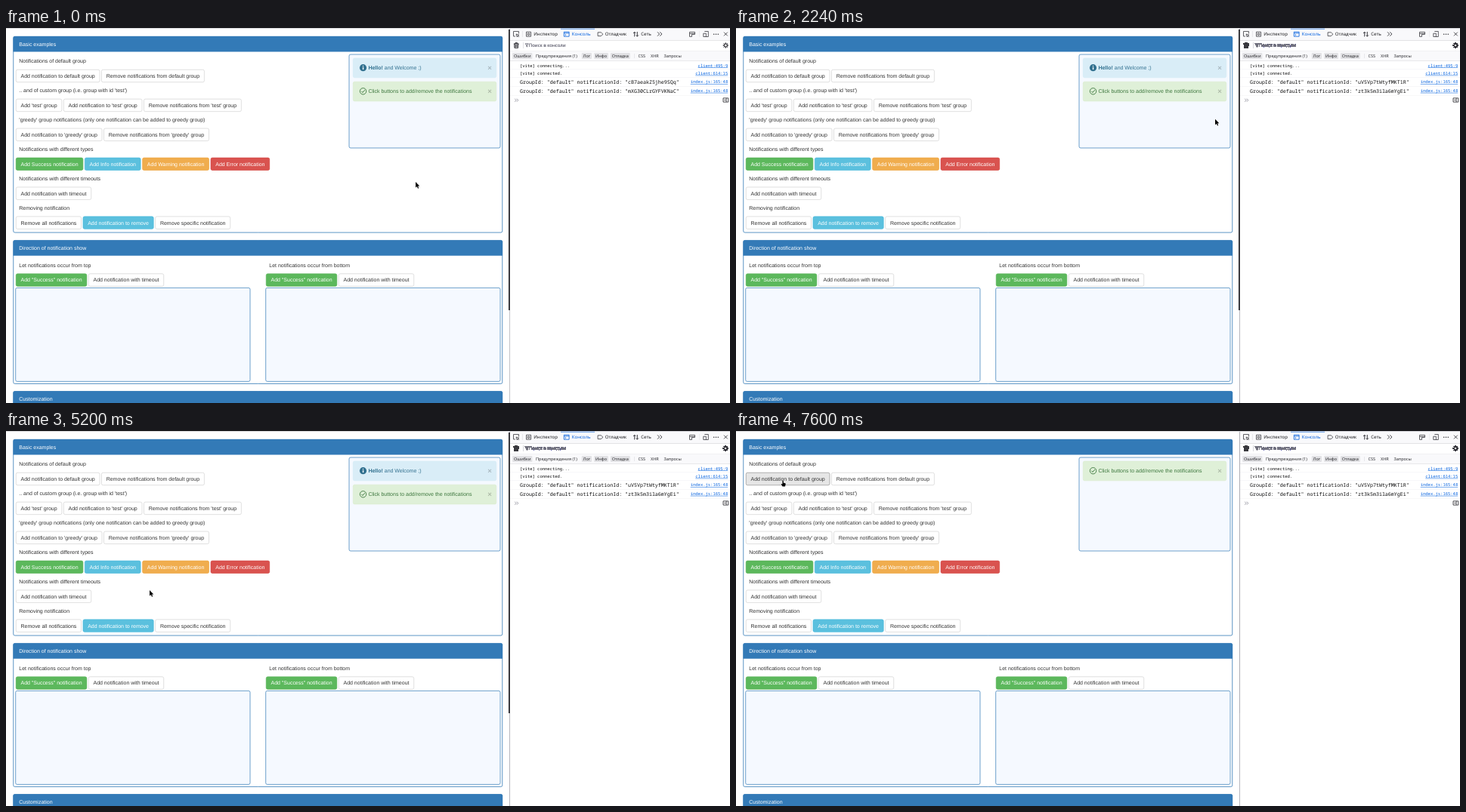
Animation of 958x497 px, one loop 8 s. Source, as an HTML page with a canvas:

```html
<!DOCTYPE html>
<html lang="en">
<head>
<meta charset="utf-8">
<title>Notification demo</title>
<style>
html, body { margin: 0; width: 100%; height: 100%; overflow: hidden; background: #fff; }
canvas { display: block; width: 958px; height: 497px; }
</style>
</head>
<body>
<canvas id="stage"></canvas>
<script>
const W = 958, H = 497, LOOP = 8000, STEP = 40;
const canvas = document.getElementById('stage');
const ctx = canvas.getContext('2d');
const dpr = window.devicePixelRatio || 1;
canvas.width = W * dpr;
canvas.height = H * dpr;

const SANS = '6.99px "Liberation Sans", Arial, sans-serif';
const UI = '"Noto Sans", sans-serif';
const MONO = '"Noto Sans Mono", monospace';
const BLUE = '#337ab7', INK = '#333', ICON = '#3a3a40', LINK = '#0060df';
const ROW = 38.92;

// [fill, border, text, hover fill, hover border]
const STYLES = {
  plain: ['#fff', '#ccc', INK, '#e6e6e6', '#a0a0a0'],
  success: ['#5cb85c', '#4cae4c', '#fff', '#449d44', '#398439'],
  info: ['#5bc0de', '#46b8da', '#fff', '#31b0d5', '#269abc'],
  warning: ['#f0ad4e', '#eea236', '#fff', '#ec971f', '#d58512'],
  danger: ['#d9534f', '#d43f3a', '#fff', '#c9302c', '#ac2925']
};

// time, x, y of the pointer tip
const PATH = [
  [0, 542, 204], [80, 541.7, 204], [160, 542, 204], [720, 542, 204], [800, 549, 208],
  [1000, 586, 218], [1200, 586, 218], [1240, 640, 218], [1360, 660, 218], [1440, 660, 217],
  [1840, 656.6, 218], [2040, 656.6, 218], [2200, 645, 150], [2400, 590, 4], [2600, 480, 110],
  [2800, 412, 179], [2880, 412, 179], [2960, 365, 171.5], [3040, 331.6, 170], [3280, 331.6, 170],
  [3320, 332, 169.3], [3440, 400, 173], [3560, 479, 155], [3800, 479, 155], [4000, 570, 95],
  [4160, 632, 62], [4320, 615, 50], [4440, 575.6, 50], [4640, 484, 94], [4840, 400, 140],
  [5040, 280, 195], [5200, 190, 211], [5480, 80, 194], [5600, 76, 186], [5720, 68, 152],
  [5760, 65, 130], [5880, 62, 102], [6080, 62, 90], [6320, 62, 65.5], [8000, 62, 65.5]
];

const clamp = v => Math.max(0, Math.min(1, v));
const ramp = (t, a, b) => clamp((t - a) / (b - a));
const ease = u => u * u * (3 - 2 * u);

function pointerAt(t) {
  const i = Math.max(1, PATH.findIndex(k => k[0] >= t));
  const [t0, x0, y0] = PATH[i - 1], [t1, x1, y1] = PATH[i];
  const u = ramp(t, t0, t1);
  return { x: x0 + (x1 - x0) * u, y: y0 + (y1 - y0) * u };
}

function rect(x, y, w, h, fill) {
  ctx.fillStyle = fill;
  ctx.fillRect(x, y, w, h);
}

function box(x, y, w, h, r, fill, border, line = 0.5) {
  ctx.beginPath();
  ctx.roundRect(x, y, w, h, r);
  if (fill) { ctx.fillStyle = fill; ctx.fill(); }
  if (border) { ctx.strokeStyle = border; ctx.lineWidth = line; ctx.stroke(); }
}

// y is the middle of the line
function text(s, x, y, color = INK, font = SANS, align = 'left') {
  ctx.font = font;
  ctx.textAlign = align;
  ctx.fillStyle = color;
  ctx.fillText(s, x, y + 2.4);
  return ctx.measureText(s).width;
}

function icon(d, x, y, color = ICON, line = 0.8, fill) {
  ctx.save();
  ctx.translate(x, y);
  const p = new Path2D(d);
  ctx.strokeStyle = ctx.fillStyle = color;
  ctx.lineWidth = line;
  if (fill) ctx.fill(p); else ctx.stroke(p);
  ctx.restore();
}

function dot(x, y, r, color) {
  ctx.beginPath();
  ctx.arc(x, y, r, 0, 7);
  ctx.fillStyle = color;
  ctx.fill();
}

function ring(x, y, r, color, line = 0.8) {
  ctx.beginPath();
  ctx.arc(x, y, r, 0, 7);
  ctx.strokeStyle = color;
  ctx.lineWidth = line;
  ctx.stroke();
}

// Row of buttons laid out by text width; returns whether one is hovered
function buttons(x, cy, items, mouse) {
  let hit = false;
  for (const [label, kind = 'plain'] of items) {
    ctx.font = SANS;
    const w = ctx.measureText(label).width + 13, y = cy - 8.5;
    const hot = mouse && mouse.x >= x && mouse.x <= x + w && mouse.y >= y && mouse.y <= y + 17;
    const c = STYLES[kind];
    box(x + 0.25, y + 0.25, w - 0.5, 16.5, 2, c[hot ? 3 : 0], c[hot ? 4 : 1], hot ? 0.8 : 0.6);
    text(label, x + 6.5, cy, c[2]);
    hit = hit || hot;
    x += w + 1.95;
  }
  return hit;
}

function panel(y, h, title) {
  box(9.75, y + 0.25, 647, h, 2, '#fff', BLUE, 0.8);
  box(9.5, y, 647.5, 20.5, [2, 2, 0, 0], BLUE);
  text(title, 17.3, y + 10.2, '#fff');
}

function page(mouse) {
  rect(0, 0, 666, H, '#fff');
  panel(11, 259.8, 'Basic examples');
  ['Notifications of default group', ".. and of custom group (i.e. group with id 'test')",
    "'greedy' group notifications (only one notification can be added to greedy group)",
    'Notifications with different types', 'Notifications with different timeouts', 'Removing notification'
  ].forEach((s, i) => text(s, 17.3, 44 + ROW * i));
  const rows = [
    [['Add notification to default group'], ['Remove notifications from default group']],
    [["Add 'test' group"], ["Add notification to 'test' group"], ["Remove notifications from 'test' group"]],
    [["Add notification to 'greedy' group"], ["Remove notifications from 'greedy' group"]],
    [['Add Success notification', 'success'], ['Add Info notification', 'info'],
      ['Add Warning notification', 'warning'], ['Add Error notification', 'danger']],
    [['Add notification with timeout']],
    [['Remove all notifications'], ['Add notification to remove', 'info'], ['Remove specific notification']]
  ];
  let hit = false;
  rows.forEach((r, i) => { hit = buttons(13, 63.5 + ROW * i, r, mouse) || hit; });
  box(454, 35, 200, 124, 2, '#f5f9ff', BLUE, 0.7);

  panel(281.2, 190, 'Direction of notification show');
  [['top', 0], ['bottom', 331]].forEach(([side, dx]) => {
    text('Let notifications occur from ' + side, 17.3 + dx, 314.3);
    hit = buttons(13 + dx, 334, [['Add "Success" notification', 'success'], ['Add notification with timeout']], mouse) || hit;
    box(12.7 + dx, 344.4, 310.3, 124, 2, '#f5f9ff', BLUE, 0.7);
  });
  panel(481.3, 60, 'Customization');
  return hit;
}

function alertBox(y, alpha, hello) {
  if (alpha <= 0) return;
  ctx.globalAlpha = alpha;
  const color = hello ? '#31708f' : '#3c763d', cy = y + 12.9;
  box(459.25, y + 0.25, 189.5, 25.8, 2, hello ? '#d9edf7' : '#dff0d8', hello ? '#cfe9f3' : '#d6e9c6');
  if (hello) {
    dot(472.5, cy, 4.6, color);
    rect(471.9, cy - 0.8, 1.3, 3.2, '#fff');
    dot(472.5, cy - 2.2, 0.75, '#fff');
    const w = text('Hello!', 479.4, cy, color, 'bold ' + SANS);
    text(' and Welcome ;)', 479.4 + w, cy, color);
  } else {
    ring(472.5, cy, 4.2, color, 0.9);
    icon('M-2.2 0L-.6 1.7L2.4 -1.6', 472.5, cy, color, 1);
    text('Click buttons to add/remove the notifications', 479.4, cy, color);
  }
  text('×', 640, cy + 0.5, 'rgba(0,0,0,.22)', 'bold 9.5px "Liberation Sans", Arial, sans-serif', 'center');
  ctx.globalAlpha = 1;
}

function toolbar() {
  const tab = '6px ' + UI;
  rect(667, 1, 291, 15.3, '#f9f9fb');
  rect(667, 16, 291, 0.6, '#e0e0e2');
  rect(667, 30, 291, 0.5, '#e0e0e2');
  rect(667, 30.5, 291, 13, '#f9f9fb');
  rect(667, 43.5, 291, 0.6, '#e0e0e2');
  rect(683.5, 4, 0.5, 8, '#d7d7db');
  rect(734, 0.5, 45, 1, LINK);

  icon('M3.5 -.5V-3.5H-3.5V3H-1M0 0L1.4 4L2.2 2.2L4 1.4ZM2 2L4 4', 675, 8);
  icon('M-3 -3H3V3H-3ZM-1.2 -1.2H1.2V1.2H-1.2Z', 691.5, 8.2);
  text('Инспектор', 698.2, 8, '#18181a', tab);
  icon('M-3.4 -3H3.4V3H-3.4ZM-3.4 -1.4H3.4M-2 0L-.8 1L-2 2', 741.7, 8.2, LINK);
  text('Консоль', 748.8, 8, LINK, tab);
  icon('M-3.3 -2.4H1L3.5 0L1 2.4H-3.3Z', 786.4, 8.2);
  text('Отладчик', 792.8, 8, '#18181a', tab);
  icon('M-1.8 3.2V-3M-3.4 -1.3L-1.8 -3L-.2 -1.3M1.8 -3.2V3M.2 1.3L1.8 3L3.4 1.3', 833.5, 8.2, ICON, 1);
  text('Сеть', 840.2, 8, '#18181a', tab);
  icon('M-3 -2.7L-.4 0L-3 2.7M.3 -2.7L2.9 0L.3 2.7', 865, 8, ICON, 0.9);
  icon('M-3.5 3V-3H3.5V0H-.5V3ZM-3.5 -1H3.5', 908, 8.4);
  rect(917.5, 4, 0.5, 8, '#e0e0e2');
  icon('M-2 -3.5H3V3.5H-.5M-3.5 -.8H0V3.5H-3.5Z', 926.3, 8);
  for (let i = -1; i < 2; i++) dot(939.5 + i * 2.8, 8.2, 0.8, ICON);
  icon('M-2.4 -2.4L2.4 2.4M2.4 -2.4L-2.4 2.4', 952.4, 8, ICON, 0.9);

  icon('M-3.3 -2H3.3M-1.2 -2V-3.3H1.2V-2M-2.5 -2L-2.2 3.4H2.2L2.5 -2M-.8 -.6V2.2M.8 -.6V2.2', 675.2, 23);
  rect(684, 19, 0.5, 8, '#d7d7db');
  icon('M-2 -2H2L.5 0V2.2L-.5 1.6V0Z', 689.2, 22.8, '#737380', 0.6);
  text('Поиск в консоли', 691.8, 22.6, '#737380', tab);
  ring(952.3, 23, 2.1, ICON, 0.9);
  for (let i = 0; i < 8; i++) {
    const a = i * Math.PI / 4, c = Math.cos(a), s = Math.sin(a);
    icon(`M${c * 2.2} ${s * 2.2}L${c * 3.6} ${s * 3.6}`, 952.3, 23);
  }
}

function filters(cleared) {
  const font = '5.5px ' + UI, dx = cleared ? -8 : 0;
  const items = [['Ошибки', 672, 1], ['Предупреждения' + (cleared ? '' : ' (1)'), 701, 0], ['Лог', 763.6 + dx, 1],
    ['Инфо', 780 + dx, 1], ['Отладка', 801.7 + dx, 1], ['CSS', 836.5 + dx, 0], ['XHR', 853 + dx, 0], ['Запросы', 870.4 + dx, 0]];
  ctx.font = font;
  for (const [s, x, on] of items) {
    ctx.font = font;
    if (on) box(x - 1.8, 32.9, ctx.measureText(s).width + 3.6, 8.2, 1, '#e2e2e5');
    text(s, x, 36.7, '#2a2a2e', font);
  }
  rect(831 + dx, 34, 0.5, 6, '#d7d7db');
}

function consoleLog(cleared, ids) {
  rect(667, 44, 291, H - 44, '#fff');
  if (!cleared) {
    const lines = [['[vite] connecting...', 'client:495:9', 49.6], ['[vite] connected.', 'client:614:15', 60]];
    ids.forEach((id, i) => lines.push([`GroupId: "default" notificationId: "${id}"`, 'index.js:165:48', 71.3 + i * 11.8]));
    lines.forEach(([s, link, y], i) => {
      text(s, 680, y - (i < 2 ? 0.4 : 0), '#0c0c0d', (i < 2 ? 5.5 : 6.63) + 'px ' + MONO);
      const w = text(link, 955.2, y - 0.4, LINK, '5.5px ' + MONO, 'right');
      rect(955.2 - w, y + 2.7, w, 0.5, LINK);
      rect(667, [54.7, 65.2, 77.2, 89][i], 291, 0.4, '#ececef');
    });
  }
  const y = cleared ? 50.5 : 95.5;
  icon('M-2.3 -2L-.3 0L-2.3 2M.3 -2L2.3 0L.3 2', 675.5, y + 0.2, '#737380', 0.7);
  icon('M-3.3 -2.6H3.5V2.6H-3.3ZM.8 -2.6V2.6M-1.8 0H0', 952.3, y, ICON, 0.9);
}

// label, y, access key position, has submenu
const MENU = [
  ['Сохранить страницу как…', 236.5, 0], ['Сохранить страницу в Папкин', 251, 8],
  ['Отправить страницу на устройство', 265.4, 2, 1], ['Выделить всё', 279.9, 11],
  ['Сделать снимок экрана', 298.8, 15], ['Исходный код страницы', 317.8, 4],
  ['Исследовать свойства поддержки доступности', 332.2], ['Исследовать', 346.8, 4],
  ['Media ClipCollector', 365.7, -1, 1], ['Translate this page (auto/ru)', 380.2], ['Search by Image', 394.7, -1, 1]
];

function menu(alpha, mouse) {
  if (alpha <= 0) return;
  const font = '7.32px ' + UI;
  ctx.globalAlpha = alpha;
  ctx.save();
  ctx.shadowColor = 'rgba(0,0,0,.2)';
  ctx.shadowBlur = 2 * dpr;
  box(542, 204, 196, 199.5, 4, '#f9f9fb', '#b4b4ba', 0.7);
  ctx.restore();
  if (mouse.y > 207 && mouse.y < 224) {
    if (mouse.x > 544 && mouse.x < 591) box(544.5, 206.5, 46.5, 17.5, 2, '#e0e0e6');
    if (mouse.x > 641 && mouse.x < 688) box(641, 206.5, 46.5, 17.5, 2, '#e0e0e6');
  }
  icon('M3.6 0H-3.2M-.4 -3L-3.4 0L-.4 3', 568, 215, '#222', 0.9);
  icon('M-3.6 0H3.2M.4 -3L3.4 0L.4 3', 615.5, 215, '#aaa', 0.9);
  icon('M2.4 -2.2A3.3 3.3 0 1 0 3.3 .3M3.1 -3.8V-1.3H.6', 664, 215.2, '#222', 0.9);
  icon('M0 -3.8L1.1 -1.3L3.8 -1L1.8 .8L2.4 3.5L0 2.1L-2.4 3.5L-1.8 .8L-3.8 -1L-1.1 -1.3Z', 712, 215, '#222');
  [226.6, 289.3, 308.3, 356.2].forEach(y => rect(544, y, 192, 0.5, '#c4c4c9'));
  for (const [s, y, key = -1, sub] of MENU) {
    text(s, 557, y, '#15141a', font);
    if (key >= 0) {
      const a = ctx.measureText(s.slice(0, key)).width;
      rect(557 + a, y + 3.4, ctx.measureText(s[key]).width, 0.5, '#15141a');
    }
    if (sub) icon('M-1.3 -2.7L1.4 0L-1.3 2.7', 729.2, y - 0.2, '#333', 0.9);
  }
  dot(550.5, 365.8, 3.5, '#e5673c');
  rect(547.2, 376.9, 6.6, 6.6, '#4a80d4');
  rect(547.2, 391.4, 6.6, 6.6, '#dc3b3b');
  ctx.globalAlpha = 1;
}

function pointer(m, hand) {
  ctx.save();
  ctx.translate(m.x, m.y);
  const shape = new Path2D(hand
    ? 'M-.6 .2Q.1 -.6 .8 .2V3L3.1 3.7Q4 4.1 3.7 5.2L3 8H-.4L-2.3 5.2Q-2.2 4.1 -.6 5Z'
    : 'M0 0V7.6L1.8 6L3 8.7L4.2 8.2L3 5.6L5.3 5.4Z');
  ctx.lineJoin = 'round';
  ctx.strokeStyle = '#fff';
  ctx.lineWidth = 0.9;
  ctx.stroke(shape);
  ctx.fillStyle = '#000';
  ctx.fill(shape);
  ctx.restore();
}

function draw(t) {
  ctx.setTransform(dpr, 0, 0, dpr, 0, 0);
  ctx.textRendering = 'geometricPrecision';
  const mouse = pointerAt(t);
  const menuAlpha = t < 1480 ? ramp(t, 320, 440) : 0;
  const loading = t >= 1560 && t < 2000;
  const hand = page(menuAlpha ? null : mouse);

  if (!loading) {
    const shown = t < 2000 ? 1 : ramp(t, 1960, 2160);
    alertBox(39.8, shown * (1 - ramp(t, 6920, 7080)), true);
    alertBox(70.9 - 31.1 * ease(ramp(t, 7280, 7600)), shown, false);
  }

  toolbar();
  filters(loading);
  consoleLog(loading, t < 1800 ? ['cB7aeakZ5jhe9SQq', 'mXG30CLrGYFVKNaC'] : ['uV5Vp7tWtyfMKT1R', 'zt3k5m3ila6mYgEi']);
  rect(0, 0, W, 0.8, '#d0d0d4');
  rect(666.4, 1, 0.6, H, '#b8b8be');
  if (!loading) {
    ctx.globalAlpha = 1 - ramp(t, 7280, 7600);
    rect(665, 2, 1.7, 372, '#2b2b30');
    ctx.globalAlpha = 1;
  }
  if (t >= 1520 && t < 2000) {
    box(-1, 485.7, 161.5, 13, [0, 2, 0, 0], '#f0f0f4', '#c8c8cd');
    text('Waiting for localhost...', 1, 491.5, '#222', '7.32px ' + UI);
  }
  menu(menuAlpha, mouse);
  pointer(mouse, hand);
}

const start = performance.now();
function frame() {
  const t = (performance.now() - start) % LOOP;
  draw(Math.floor(t / STEP) * STEP);
  requestAnimationFrame(frame);
}
frame();
</script>
</body>
</html>
```
